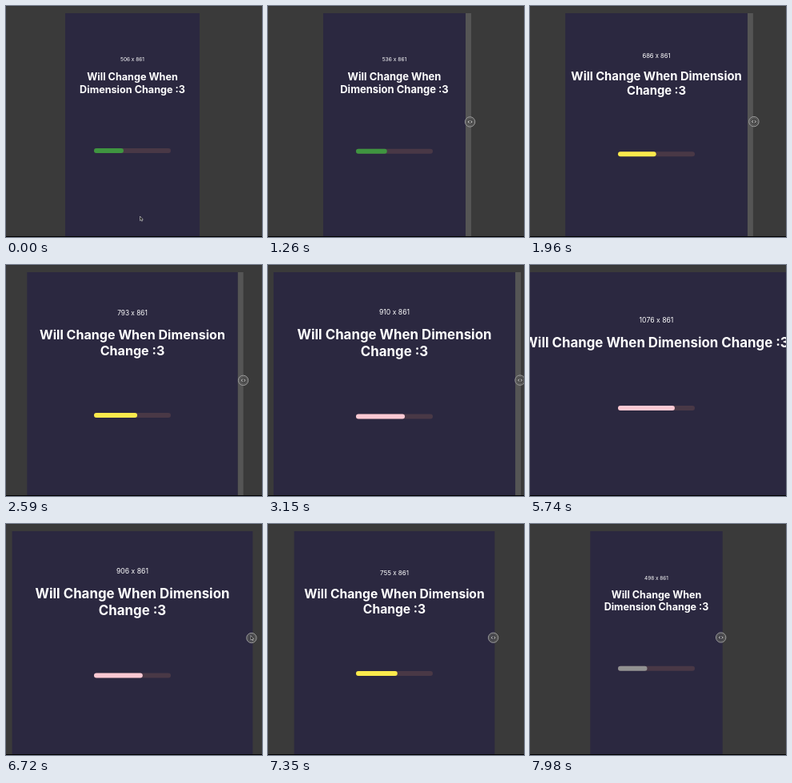
These frames come from a looping animation (320 by 289 pixels, 8000 ms). An HTML page:

```html
<!DOCTYPE html>
<html lang="en">
<head>
<meta charset="utf-8">
<title>Responsive panel</title>
<style>
  html, body { margin: 0; height: 100%; overflow: hidden; background: #3a3a3a; }
  svg { display: block; width: 100vw; height: 100vh; }
  text { fill: #fff; text-anchor: middle; font-family: Inter, "Liberation Sans", sans-serif; }
  #title { font-weight: 700; }
</style>
</head>
<body>
<svg viewBox="0 0 320 289" preserveAspectRatio="none">
  <rect width="320" height="289" fill="#3a3a3a"/>
  <rect width="320" height="1" fill="#343434"/>
  <rect id="handle" y="9" width="7" height="279" fill="#555"/>
  <rect id="panel" y="9" height="279" fill="#2b2840"/>
  <rect y="288" width="320" height="1" fill="#000"/>
  <text id="label" x="158"></text>
  <g id="title"><text x="158"></text><text x="158"></text></g>
  <g id="bar">
    <rect x="110" y="-3" width="96" height="6" rx="3" fill="#493846"/>
    <rect id="fill" x="110" y="-3" height="6" rx="3"/>
  </g>
  <g id="cursor">
    <g id="ring" fill="none" stroke="#a8a8a8">
      <circle r="6.2" fill="#4a4a4a" fill-opacity=".7" stroke-width=".9"/>
      <circle r="4.6" stroke="#777" stroke-width=".5"/>
    </g>
    <path id="resize" d="M-.8-1.5L-2.6 0L-.8 1.5M.8-1.5L2.6 0L.8 1.5" fill="none" stroke="#ddd" stroke-width=".8"/>
    <path id="arrow" d="M-1-3V2.6L.3 1.5L1.2 3.3L2 2.9L1.2 1.2H2.8Z" fill="#111" stroke="#ddd" stroke-width=".6"/>
  </g>
</svg>
<script>
const LOOP = 8000, STEP = 70, SCALE = 0.332, MID = 158;
const $ = id => document.getElementById(id);
const set = (el, attrs) => { for (const k in attrs) el.setAttribute(k, attrs[k]); };
const lines = $('title').children;
const words = 'Will Change When Dimension Change :3'.split(' ');

// [time, value] pairs, linear in between
const widths = [[1120, 506], [1960, 686], [2170, 705], [3150, 910], [4130, 992], [4410, 992],
  [5390, 1084], [5530, 1084], [5740, 1076], [5880, 1076], [6510, 970], [6720, 906],
  [6790, 906], [7560, 699], [7980, 498]];
const offsets = [[1050, 2], [1400, 8], [1960, 8], [3150, 6], [4130, 5], [5530, -1], [7980, -2]];

function at(keys, t) {
  if (t <= keys[0][0]) return keys[0][1];
  const i = keys.findIndex(k => k[0] >= t);
  if (i < 0) return keys[keys.length - 1][1];
  const [t0, a] = keys[i - 1], [t1, b] = keys[i];
  return a + (b - a) * (t - t0) / (t1 - t0);
}

function put(el, text, y, size) {
  el.textContent = text;
  set(el, { y: y + size * 0.36, 'font-size': size });
}

function drawCursor(t, edge) {
  const p = Math.min(Math.max((t - 70) / 980, 0), 1);
  const e = p * p * (3 - 2 * p);
  const dragging = t >= 1120;
  const x = dragging ? edge + at(offsets, t) : 168.5 + (244 - 168.5) * e;
  const y = dragging ? 145 - 3 * (t - 1120) / 6860 : 266 - 121 * e;
  const released = t >= 6720 && t < 6860;
  const arrow = t < 1050 || released;
  set($('cursor'), { transform: `translate(${x} ${y})` });
  set($('ring'), { visibility: dragging ? 'visible' : 'hidden' });
  set($('resize'), { visibility: arrow ? 'hidden' : 'visible' });
  set($('arrow'), { visibility: arrow ? 'visible' : 'hidden' });
}

function draw(t) {
  const w = Math.round(at(widths, t));
  const half = w * SCALE / 2, edge = MID + half;
  set($('panel'), { x: MID - half, width: half * 2 });
  set($('handle'), { x: edge, visibility: t > 1120 && t < 4480 ? 'visible' : 'hidden' });

  // the column is centred, so its height moves everything
  const size = Math.min(6.53 + 0.01206 * w, 16.85);
  const split = w < 606 ? 3 : w < 945 ? 4 : w < 1003 ? 5 : 6;
  const lead = split < 6 ? size * 1.24 : 0;
  const toTitle = size * 1.68, toBar = 62 + size * 1.18;
  const top = 124 - (toTitle + lead + toBar) / 2;
  put($('label'), `${w} x 861`, top, size * 0.515);
  put(lines[0], words.slice(0, split).join(' '), top + toTitle, size);
  put(lines[1], words.slice(split).join(' '), top + toTitle + lead, size);

  set($('bar'), { transform: `translate(0 ${top + toTitle + lead + toBar})` });
  set($('fill'), {
    width: 6.8 + 0.0596 * w,
    fill: w < 500 ? '#929292' : w < 600 ? '#3f9540' : w < 800 ? '#fbea4c' : '#fcc9d3'
  });
  drawCursor(t, edge);
}

const start = performance.now();
function frame() {
  const t = (performance.now() - start) % LOOP;
  draw(Math.floor(t / STEP) * STEP);
  requestAnimationFrame(frame);
}
frame();
</script>
</body>
</html>
```
